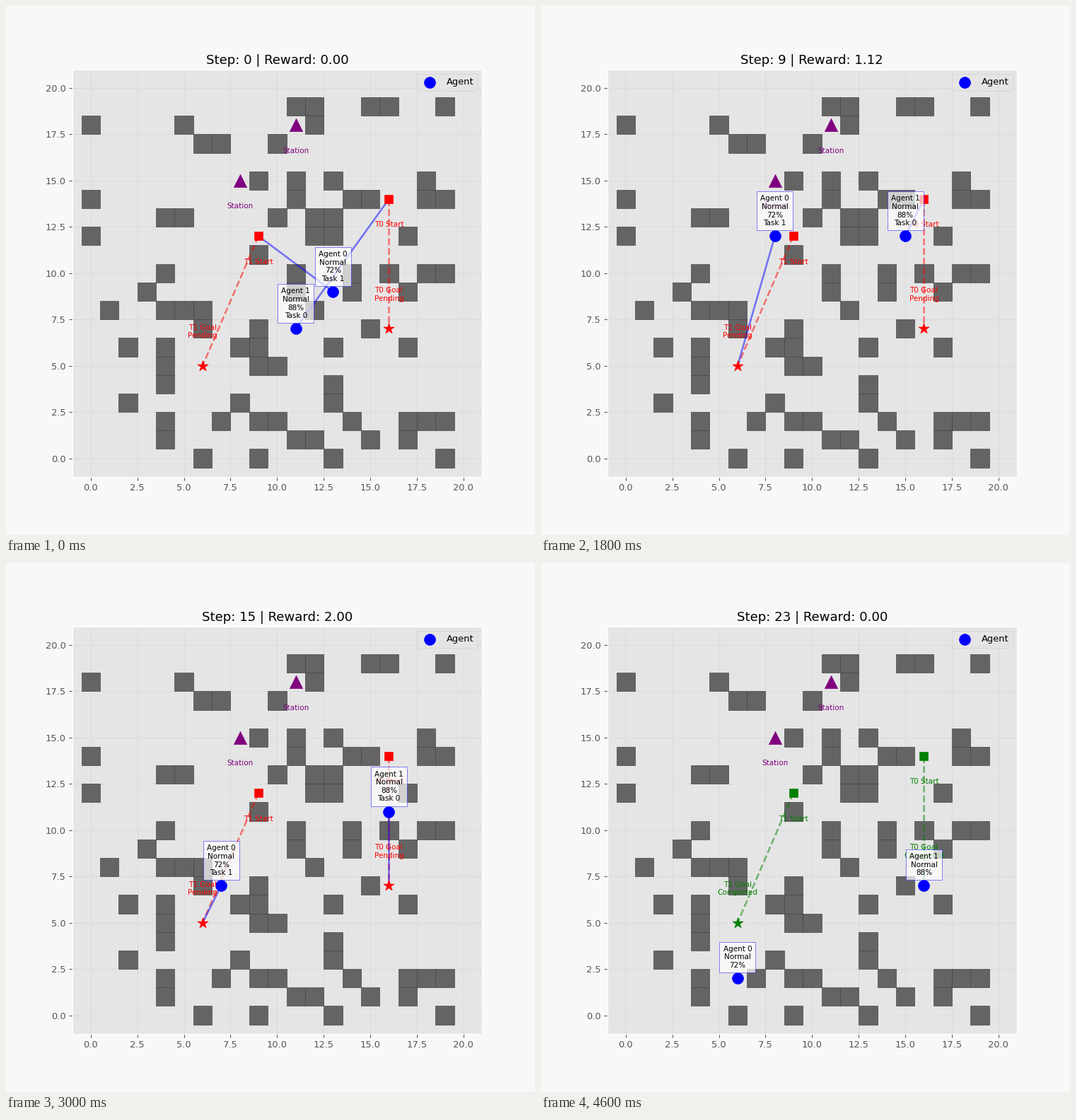
Write a matplotlib script that moves like this. It is 748 by 748 pixels and loops after 4.8 s.

```python
import numpy as np
import matplotlib.pyplot as plt
from matplotlib.animation import FuncAnimation
from matplotlib.patches import Rectangle

STEPS, INTERVAL = 24, 200

plt.rcParams.update({
    "font.family": "DejaVu Sans",
    "font.size": 10,
    "patch.linewidth": 0.5,
    "axes.facecolor": "#e5e5e5",
    "axes.edgecolor": "white",
    "axes.linewidth": 1,
    "axes.axisbelow": True,
    "xtick.color": "#555555",
    "ytick.color": "#555555",
})

# Blocked columns for each grid row
WALLS = {
    19: (11, 12, 15, 16, 19), 18: (0, 5, 12), 17: (6, 7, 10),
    15: (9, 11, 13, 18), 14: (0, 11, 14, 15, 18, 19),
    13: (4, 5, 10, 12, 13), 12: (0, 12, 13, 17), 11: (9,),
    10: (4, 11, 14, 16, 18, 19), 9: (3, 11, 14, 17), 8: (1, 4, 5, 6, 12),
    7: (6, 9, 15), 6: (2, 4, 8, 9, 13, 17), 5: (4, 9, 10), 4: (4, 13),
    3: (2, 8, 13), 2: (4, 7, 9, 10, 14, 17, 18, 19),
    1: (4, 11, 12, 15, 17), 0: (6, 9, 13, 19),
}
STATIONS = [(8, 15), (11, 18)]
MOVES = {"U": (0, 1), "D": (0, -1), "L": (-1, 0), "R": (1, 0), ".": (0, 0)}
REWARDS = ([0, -0.25, 2, 2, 2, 1.25, 1.25, 1.25, 11, 1.125, 1.25, 2, 12]
           + [2] * 5 + [1, 1, 0.75, 0, 1, 0])

fig, ax = plt.subplots(figsize=(8, 8), dpi=93.5, facecolor="#f8f8f8")
ax.set(xlim=(-1, 21), ylim=(-1, 21),
       xticks=np.arange(0, 21, 2.5), yticks=np.arange(0, 21, 2.5))
ax.grid(True, color="#dcdcdc", linewidth=0.8)
title = ax.set_title("", fontsize=14)


def marker(pos, shape, size, color, **kw):
    return ax.scatter(*pos, marker=shape, s=size, c=color, zorder=3, **kw)


def note(pos, text, color, **kw):
    return ax.text(*pos, text, color=color, fontsize=8, ha="center",
                   zorder=4, **kw)


class Task:
    def __init__(self, idx, start, goal, pickup, done):
        self.idx, self.start, self.goal = idx, start, goal
        self.pickup, self.done = pickup, done
        self.line, = ax.plot(*zip(start, goal), "--", color="red", lw=2,
                             alpha=0.5, zorder=2)
        self.marks = [marker(start, "s", 100, "red"),
                      marker(goal, "*", 150, "red")]
        self.notes = [note((x, y + 1.5), f"T{idx} Start", "red")
                      for x, y in (start, goal)]

    def update(self, step):
        finished = step >= self.done
        color = "green" if finished else "red"
        state = "Completed" if finished else "Pending"
        for art in [self.line, *self.marks, *self.notes]:
            art.set_color(color)
        self.notes[1].set_text(f"T{self.idx} Goal\n{state}")


class Agent:
    def __init__(self, idx, start, moves, charge, task):
        self.idx, self.charge, self.task = idx, charge, task
        self.path = np.cumsum([start] + [MOVES[m] for m in moves], axis=0)
        self.line, = ax.plot([], [], color="blue", lw=2, alpha=0.5, zorder=2)
        self.dot = marker(start, "o", 150, "blue",
                          label="Agent" if idx == 0 else None)
        self.note = note(start, "", "black", va="bottom",
                         bbox=dict(facecolor="white", edgecolor="blue",
                                   alpha=0.7))

    def update(self, step):
        x, y = self.path[step]
        task = self.task
        busy = step < task.done
        tx, ty = task.goal if step >= task.pickup else task.start
        self.line.set_data([x, tx], [y, ty])
        self.line.set_visible(busy)
        self.dot.set_offsets([(x, y)])
        self.note.set_position((x, y + 0.5))
        text = f"Agent {self.idx}\nNormal\n{self.charge}%"
        self.note.set_text(text + f"\nTask {task.idx}" * busy)


for row, cols in WALLS.items():
    for col in cols:
        ax.add_patch(Rectangle((col - 0.5, row - 0.5), 1, 1, lw=0.5,
                               facecolor="#646464", edgecolor="#404040"))

for sx, sy in STATIONS:
    marker((sx, sy), "^", 200, "purple")
    note((sx, sy - 1.5), "Station", "purple")

tasks = [Task(0, (16, 14), (16, 7), pickup=12, done=23),
         Task(1, (9, 12), (6, 5), pickup=8, done=18)]
for t in tasks:
    t.notes[0].set_y(t.start[1] - 1.5)

agents = [Agent(0, (13, 9), ".UULLULLLDDDDDLDDLDDDDU", 72, tasks[1]),
          Agent(1, (11, 7), "RRUUUURRUURUDDDLDDDRUDD", 88, tasks[0])]
ax.legend(loc="upper right")


def update(step):
    title.set_text(f"Step: {step} | Reward: {REWARDS[step]:.2f}")
    for item in tasks + agents:
        item.update(step)
    return []


anim = FuncAnimation(fig, update, frames=STEPS, interval=INTERVAL,
                     init_func=lambda: update(0), repeat=True, repeat_delay=0)
plt.show()
```
